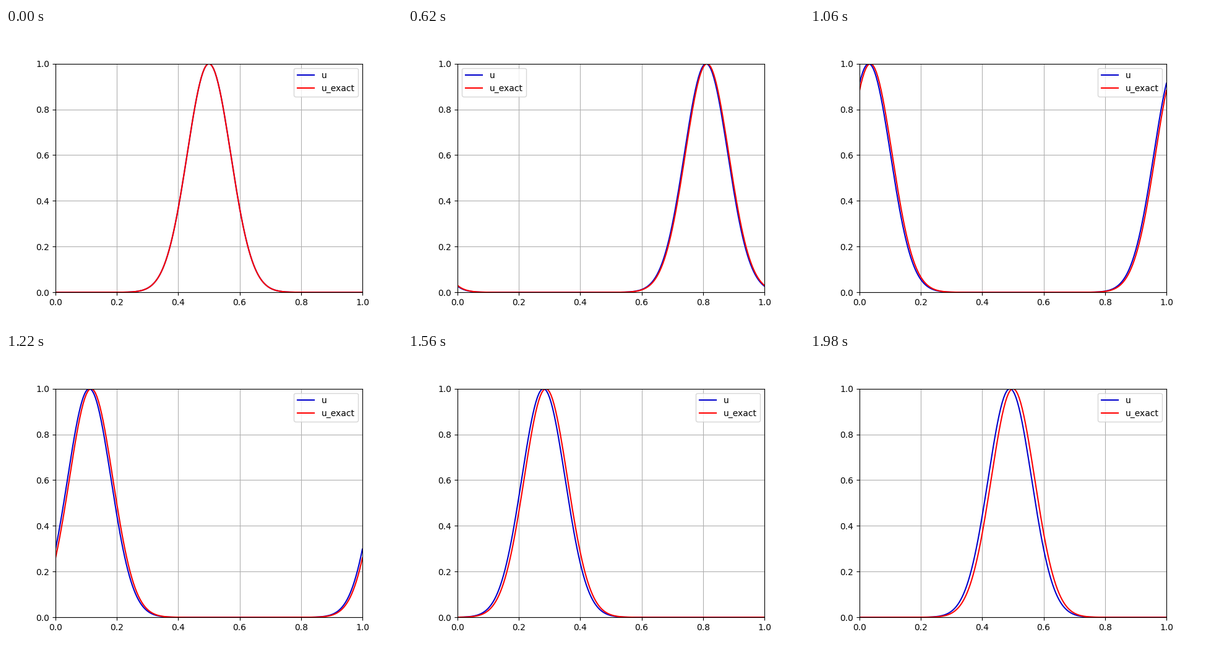
These frames come from a looping animation (640 by 480 pixels, 2000 ms). A matplotlib script:

```python
import numpy as np
import matplotlib.pyplot as plt
from matplotlib.animation import FuncAnimation

FRAMES = 100
INTERVAL = 20
STEP = 0.01                    # shift of the numerical wave per frame
EXACT_STEP = 1 / (FRAMES - 1)  # the exact wave makes one full turn

x = np.linspace(0, 1, 201)


def pulse(center):
    """Gaussian pulse on the periodic unit interval."""
    d = (x - center + 0.5) % 1 - 0.5
    return np.exp(-100 * d**2)


fig, ax = plt.subplots(figsize=(6.4, 4.8), dpi=100)
ax.set_xlim(0, 1)
ax.set_ylim(0, 1)
ax.grid(True)

line_u, = ax.plot(x, pulse(0.5), color="mediumblue", label="u")
line_exact, = ax.plot(x, pulse(0.5), color="red", label="u_exact")
ax.legend(loc="best")  # moves aside when the pulse passes under it


def update(i):
    line_u.set_ydata(pulse(0.5 + STEP * i))
    line_exact.set_ydata(pulse(0.5 + EXACT_STEP * i))
    return line_u, line_exact


anim = FuncAnimation(fig, update, frames=FRAMES, interval=INTERVAL,
                     repeat=True, repeat_delay=0)
plt.show()
```
